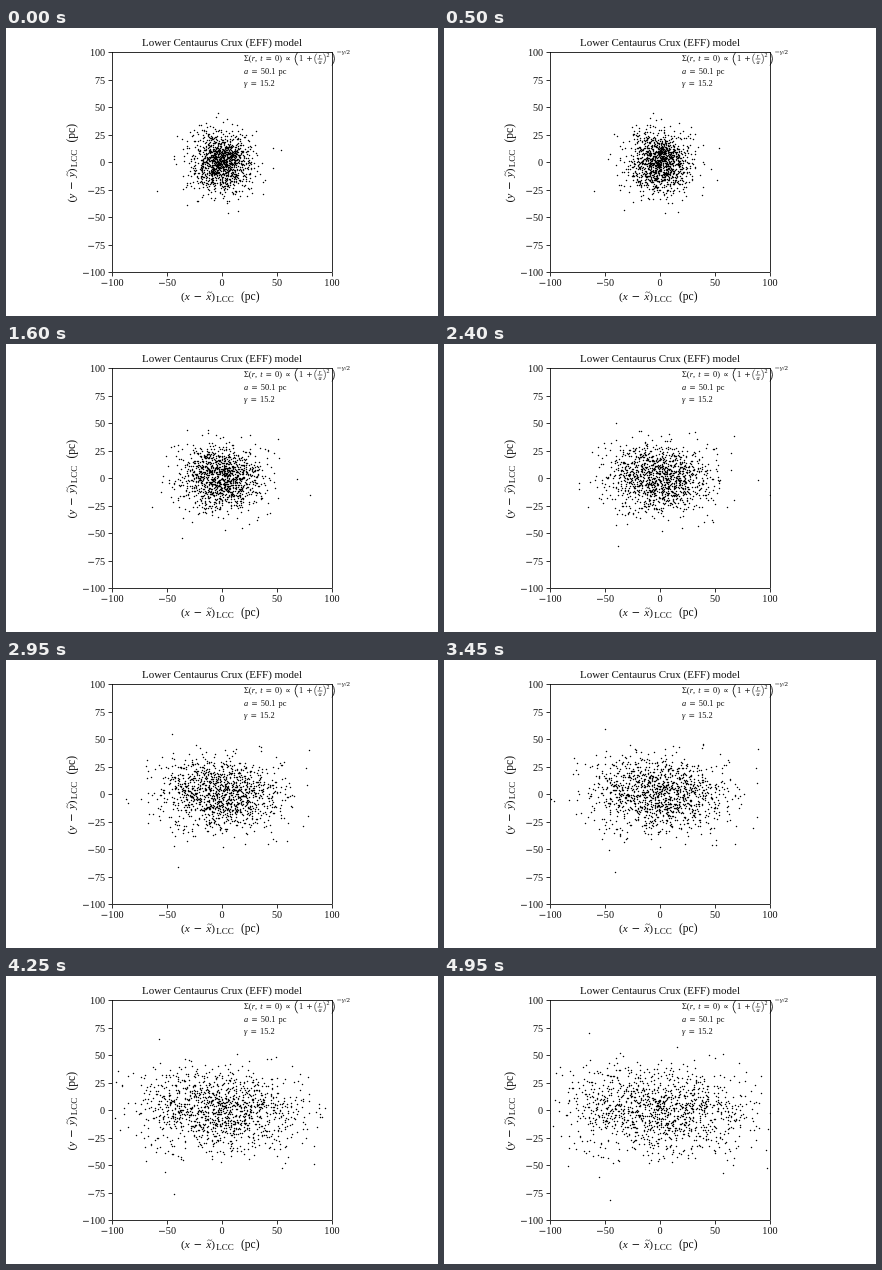
An HTML page for the animation above (5000 ms loop, 432 by 288 pixels).

```html
<!DOCTYPE html>
<html lang="en">
<head>
<meta charset="utf-8">
<title>Expanding star cluster</title>
<style>
html, body { margin: 0; width: 100%; height: 100%; overflow: hidden; background: #fff; }
svg { display: block; width: 432px; height: 288px; }
text { font-family: "Liberation Serif", "Times New Roman", serif; fill: #111; white-space: pre; word-spacing: 1px; }
.title { word-spacing: 0; }
.var { font-style: italic; }
.op { font-family: "DejaVu Sans", sans-serif; font-size: .92em; }
.line { fill: none; stroke: #000; stroke-width: .8; }
.thin { fill: none; stroke: #111; stroke-width: .6; }
#stars { fill: none; stroke: #000; stroke-width: 1.5; stroke-linecap: round; }
</style>
</head>
<body>
<svg viewBox="0 0 432 288" xmlns="http://www.w3.org/2000/svg">
  <clipPath id="box"><rect x="106" y="24" width="221" height="221"/></clipPath>
  <rect width="432" height="288" fill="#fff"/>
  <path id="stars" clip-path="url(#box)"/>
  <rect class="line" x="106.5" y="24.5" width="220" height="220"/>
  <text class="title" x="216" y="18" font-size="11" text-anchor="middle">Lower Centaurus Crux (EFF) model</text>
  <g id="labels"></g>
</svg>
<script>
const LOOP = 5000, STEP = 50, COUNT = 1260;
const CX = 216.5, CY = 134.5, SCALE = 1.1;   // plot centre and pixels per parsec
const PULL = 0.005;                          // slow restoring force along y

// ---------- labels ----------
const NS = "http://www.w3.org/2000/svg";
const labels = document.getElementById("labels");

function add(parent, tag, attrs, content) {
  const el = document.createElementNS(NS, tag);
  for (const k in attrs) el.setAttribute(k, attrs[k]);
  if (content) el.textContent = content;
  parent.appendChild(el);
  return el;
}
const path = (parent, d, cls = "thin") => add(parent, "path", { d, class: cls });

// Single letters become italic variables, signs become wide operators
function math(parent, x, y, size, str, anchor = "start") {
  const el = add(parent, "text", { x, y, "font-size": size, "text-anchor": anchor });
  for (const part of str.split(/([−=+∝]|γ|\b[a-z]\b)/)) {
    if (!part) continue;
    const cls = /[−=+∝]/.test(part) ? "op" : /^[a-zγ]$/.test(part) ? "var" : "";
    add(el, "tspan", { class: cls }, part);
  }
}

function axes() {
  for (let v = -100; v <= 100; v += 25) {
    const name = String(v).replace("-", "−");
    const x = Math.floor(CX + v * SCALE) + .5, y = Math.floor(CY - v * SCALE) + .5;
    path(labels, `M106 ${y}h-3.5`, "line");
    math(labels, 99.2, y + 3, 10.2, name, "end");
    if (v % 50) continue;
    path(labels, `M${x} 245v3.5`, "line");
    math(labels, x - .5, 257.5, 10.2, name, "middle");
  }
}

function axisLabel(letter, transform) {
  const g = add(labels, "g", { transform });
  math(g, 0, 0, 11.3, `(${letter} − ${letter})`);
  path(g, "M26.3 -7.2q1.3 -1.6 2.4 -.6t2.4 -.6");
  math(g, 35.3, 2, 9, "LCC");
  math(g, 60, 0, 11.5, "(pc)");
}

// Pair of round brackets from x0 to x1, h high, centred on y
function brackets(x0, x1, y, h, cls) {
  const bow = h * .38;
  for (const [x, b] of [[x0, -bow], [x1, bow]])
    path(labels, `M${x} ${y - h / 2}q${b} ${h / 2} 0 ${h}`, cls);
}

function formula() {
  const size = 8.4, top = 33;
  math(labels, 238, top, size, "Σ(r, t = 0) ∝");
  math(labels, 293, top, size, "1 +");
  math(labels, 314, 29.6, 6.3, "r", "middle");
  math(labels, 314, 36, 6.3, "a", "middle");
  path(labels, "M311.6 31h4.8");
  math(labels, 320.5, 29, 6, "2");
  brackets(291.6, 326, 30.8, 13, "line");
  brackets(310.6, 317.6, 30.8, 10.4);
  math(labels, 330.5, 26, 7, "−γ/2");
  math(labels, 238, 46, size, "a = 50.1 pc");
  math(labels, 238, 57.5, size, "γ = 15.2");
}

// ---------- stars ----------
let seed = 20417;
function rnd() {
  seed = (seed + 0x6D2B79F5) | 0;
  let n = Math.imul(seed ^ (seed >>> 15), 1 | seed);
  n = (n + Math.imul(n ^ (n >>> 7), 61 | n)) ^ n;
  return ((n ^ (n >>> 14)) >>> 0) / 4294967296;
}
const gauss = () => Math.sqrt(-2 * Math.log(1 - rnd())) * Math.cos(2 * Math.PI * rnd());

const yAt = (s, t) => s.y + s.vy * t - PULL * (s.y + s.vy * t / 3) * t * t;

// Power-law surface density with a flat core; velocities lean slightly with x
function makeStar() {
  const r = 44 * SCALE * Math.sqrt(Math.pow(1 - rnd(), -1 / 6.6) - 1);
  const a = 2 * Math.PI * rnd();
  const vx = 9 * gauss();
  return { x: r * Math.cos(a), y: r * Math.sin(a), vx, vy: 3.7 * gauss() + .07 * vx };
}

// Stars that mark the edge of the cloud: offset, then pixels per second
const stars = [
  { x: -35, y: 43, vx: -3, vy: 11 },
  { x: -18.4, y: -32, vx: -10.6, vy: -10.2 },
  { x: 43, y: 18, vx: 28, vy: -.2 },
  { x: 19.5, y: -33, vx: 22.8, vy: -4.2 },
  { x: 59, y: -12, vx: -1, vy: -5 },
  { x: -65, y: 29, vx: -3, vy: .4 }
];
while (stars.length < COUNT) {
  const s = makeStar();
  if (Math.hypot(s.x, s.y) < 54 && Math.abs(yAt(s, 5)) < 70) stars.push(s);
}

const dots = document.getElementById("stars");
const snap = v => Math.floor(v) + .5;
function draw(ms) {
  const t = Math.floor((ms % LOOP) / STEP) * STEP / 1000;
  dots.setAttribute("d", stars.map(s =>
    `M${snap(CX + s.x + s.vx * t)} ${snap(CY + yAt(s, t))}h.01`).join(""));
}

axes();
axisLabel("x", "translate(175 272)");
axisLabel("y", "translate(69 174.5) rotate(-90)");
formula();

const start = performance.now();
function tick() {
  draw(performance.now() - start);
  requestAnimationFrame(tick);
}
tick();
</script>
</body>
</html>
```
